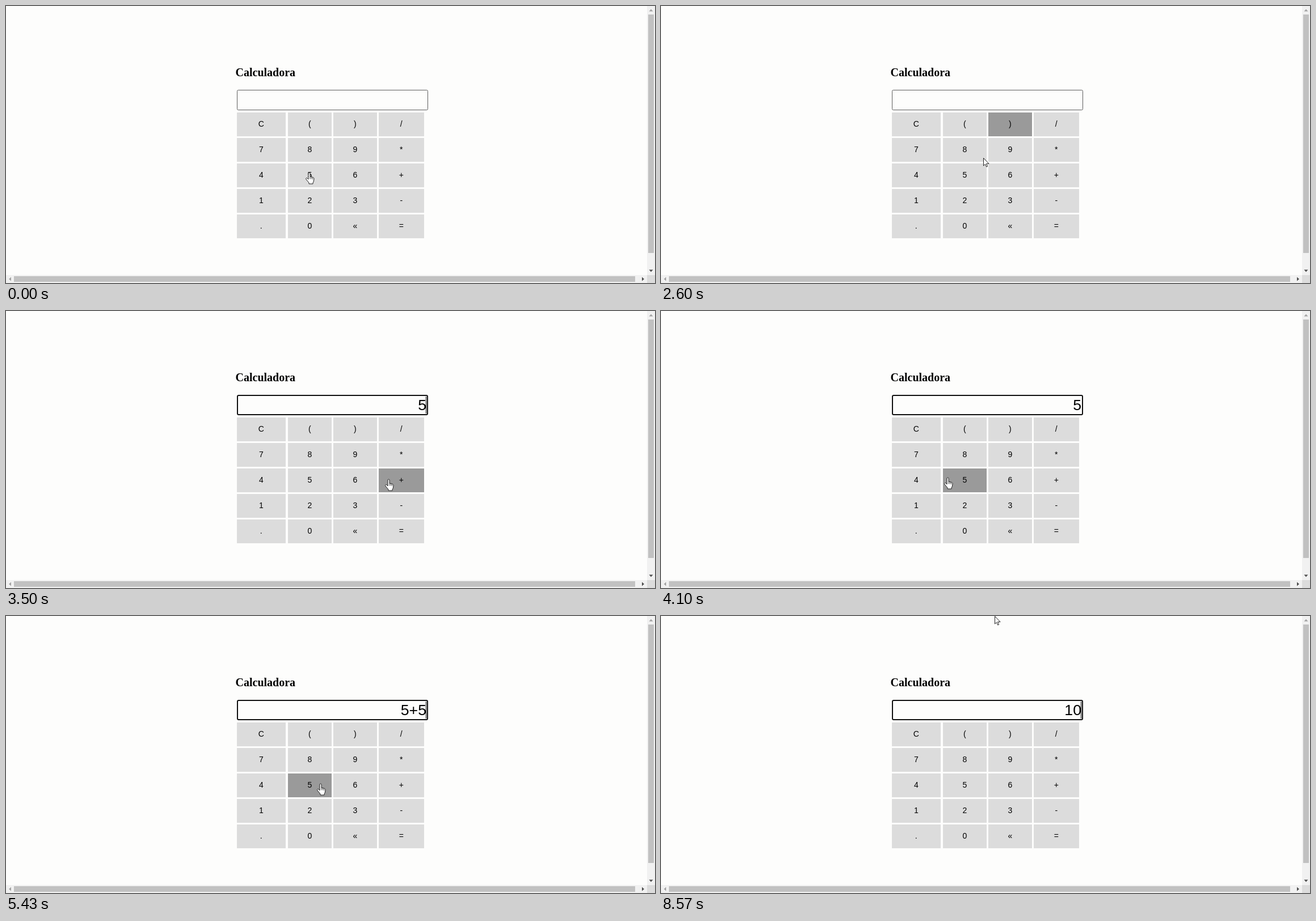
These frames come from a looping animation (1144 by 489 pixels, 8.81 s). An HTML page:

```html
<!DOCTYPE html>
<html lang="es">
<head>
<meta charset="utf-8">
<title>Calculadora</title>
<style>
  html, body { margin: 0; width: 100%; height: 100%; overflow: hidden; background: #fdfdfc; }
  svg { display: block; }
  text { font-family: "Liberation Sans", Arial, sans-serif; white-space: pre; }
  .title { font: bold 20px "Liberation Serif", "Times New Roman", serif; }
  .label { font-size: 14px; text-anchor: middle; }
  .value { font-size: 26.67px; text-anchor: end; }
  .key { fill: #dcdcdc; }
  .key.hover { fill: #9a9a9a; }
  .cursor path { fill: #fff; stroke: #222; stroke-width: 1; stroke-linejoin: round; }
  .cursor .lines { fill: none; stroke-width: .8; }
</style>
</head>
<body>
<svg width="1144" height="489" viewBox="0 0 1144 489">
  <rect width="1144" height="489" fill="#fdfdfc"/>
  <g shape-rendering="crispEdges">
    <path fill="#f1f1f1" d="M1130 0h14v475h-14zM0 475h1130v14H0z"/>
    <path fill="#dcdcdc" d="M1130 475h14v14h-14z"/>
    <path fill="#c1c1c1" d="M1132 15h10v421h-10zM14 477h1095v10H14z"/>
  </g>
  <path fill="#a3a3a3" d="M1133.500 9.500h7l-3.500-4zM9 478.500v7l-4-3.500z"/>
  <path fill="#505050" d="M1133.500 465.500h7l-3.500 4zM1121 478.500v7l4-3.500z"/>

  <text class="title" x="404.500" y="124">Calculadora</text>
  <rect id="field" fill="#fdfdfc"/>
  <text id="value" class="value" x="741" y="175"></text>
  <path id="caret" d="M740.500 151v30" stroke="#000"/>
  <g id="keys"></g>

  <g id="cursor" class="cursor">
    <path id="arrow" d="M.5 .5V14l3-2.800 2.200 4.800 2-1-2.200-4.600h4.500z"/>
    <g id="hand">
      <path d="M-2 11V1q0-2 1.500-2t1.500 2v5l5.500 1.500q1.500.7 1.500 2.500l-.8 5-1.200 2v2h-7v-2l-5-6q-1-2 .5-2.500t3.500 2.500z"/>
      <path class="lines" d="M1 6v4.500M3.300 7v3.500M5.600 7.500v3.500"/>
    </g>
  </g>
</svg>
<script>
const LOOP = 8810, TICKS_PER_MS = 0.03;
const BLINK = 15.4;      // ticks between caret toggles
const HOVER_LAG = 3;     // the page highlights keys this late
const SHAPE_LAG = 1;     // the cursor changes shape this late
const PAGE_READY = 73;   // no key reacts before this tick

const byId = id => document.getElementById(id);
const [field, value, caret, keypad, cursor, arrow, hand] =
  ['field', 'value', 'caret', 'keys', 'cursor', 'arrow', 'hand'].map(byId);

function add(tag, attributes, content = '') {
  const node = document.createElementNS('http://www.w3.org/2000/svg', tag);
  setAll(node, attributes);
  node.textContent = content;
  return keypad.appendChild(node);
}

function setAll(node, attributes) {
  for (const name in attributes) node.setAttribute(name, attributes[name]);
}

// Column edges come from the widest label of a table, so widths vary
const columns = [[407, 86], [497, 77], [577, 77], [657, 80]];
const height = 42;
const keys = ['C()/', '789*', '456+', '123-', '.0«='].flatMap((labels, row) =>
  [...labels].map((label, column) => {
    const [x, width] = columns[column];
    const y = Math.round(187.6 + row * 45.15);
    const node = add('rect', { class: 'key', x, y, width, height });
    add('text', { class: 'label', x: x + width / 2 - 0.2, y: y + 25 }, label);
    return { node, x, y, width };
  }));

// Pointer moves: [start tick, end tick, x, y]
const home = [535, 295];
const moves = [
  [14, 15, 541, 299],
  [73, 75, 594, 218], [75, 78, 568, 268], [78, 82, 545, 300],
  [95, 102, 675, 298], [110, 121, 500, 294],
  [122, 130, 641, 312], [131, 136, 676, 300],
  [142, 145, 554, 299], [147, 154, 555, 297],
  [163, 166, 551, 296], [233, 250, 588, 0]
];

const typed = [[95, '5'], [147, '5+'], [163, '5+5']];
const result = [189, '10'];

const clamp = t => Math.max(0, Math.min(1, t));
const smooth = t => t * t * (3 - 2 * t);

function pointerAt(tick) {
  return moves.reduce(([x, y], [start, end, toX, toY]) => {
    const part = smooth(clamp((tick - start) / (end - start)));
    return [x + (toX - x) * part, y + (toY - y) * part];
  }, home);
}

function keyAt([px, py]) {
  return keys.find(({ x, y, width }) =>
    px >= x && px < x + width && py >= y && py < y + height);
}

function drawField(tick) {
  const last = typed.findLast(([at]) => at <= tick);
  const line = last ? 2 : 1;
  setAll(field, {
    x: 407 + line / 2, y: 148 + line / 2, width: 337 - line, height: 36 - line,
    rx: 2, stroke: last ? '#101010' : '#5c5c5c', 'stroke-width': line
  });
  value.textContent = tick >= result[0] ? result[1] : last ? last[1] : '';
  const caretOn = last && Math.floor((tick - last[0]) / BLINK) % 2 === 0;
  caret.style.display = caretOn ? '' : 'none';
}

function drawKeys(tick) {
  const hovered = tick < PAGE_READY ? null : keyAt(pointerAt(tick - HOVER_LAG));
  for (const key of keys) key.node.classList.toggle('hover', key === hovered);
}

function drawCursor(tick) {
  const [x, y] = pointerAt(tick).map(Math.round);
  const overKey = keyAt(pointerAt(tick - SHAPE_LAG));
  cursor.setAttribute('transform', `translate(${x} ${y})`);
  arrow.style.display = overKey ? 'none' : '';
  hand.style.display = overKey ? '' : 'none';
}

function draw() {
  const tick = Math.floor((performance.now() % LOOP + 4) * TICKS_PER_MS);
  drawField(tick);
  drawKeys(tick);
  drawCursor(tick);
  requestAnimationFrame(draw);
}
draw();
</script>
</body>
</html>
```
